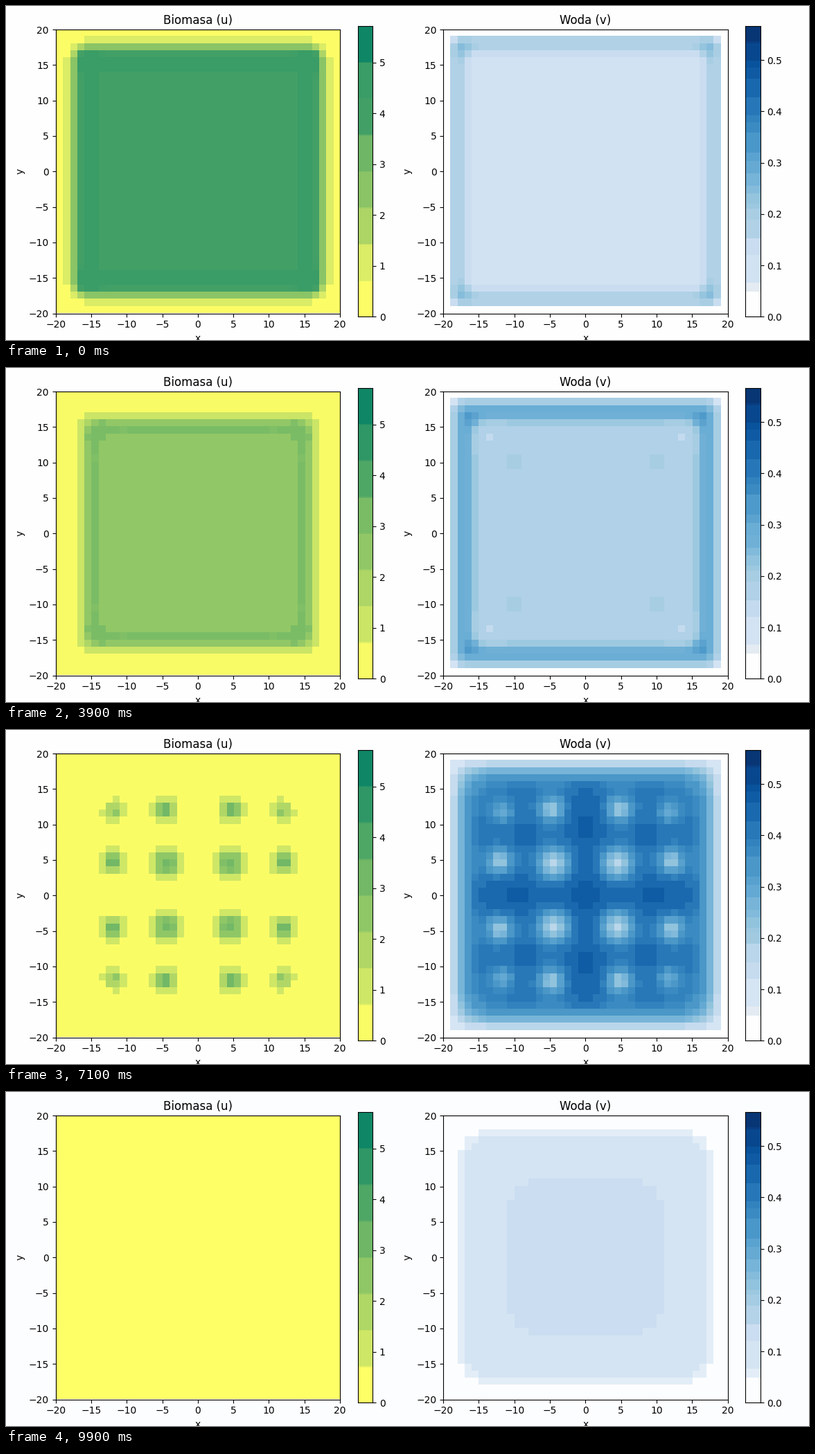
Recreate the animation shown at these times as a matplotlib script. Size 1159 by 483 pixels, loop 10000 ms.

```python
import numpy as np
import matplotlib
import matplotlib.pyplot as plt
from matplotlib.animation import FuncAnimation

W, H, DPI = 1159, 483, 100
FRAMES, INTERVAL = 100, 100
N = 40
U_MAX, V_MAX = 5.72, 0.566

# Klausmeier vegetation model with slowly falling rainfall
MORTALITY = 0.45
DX = 40 / (N - 1)
D_U, D_V = 0.25 / DX**2, 10.5 / DX**2
RAIN_START, RAIN_STEP = 2.0, 0.01893
DT = 0.01
STEPS, WARM_UP = 400, 4000


def laplacian(f):
    return (f[:-2, 1:-1] + f[2:, 1:-1] + f[1:-1, :-2] + f[1:-1, 2:]
            - 4 * f[1:-1, 1:-1])


def advance(u, v, rain, rain_end, steps):
    ui, vi = u[1:-1, 1:-1], v[1:-1, 1:-1]
    for a in np.linspace(rain, rain_end, steps):
        uptake = vi * ui * ui
        du = D_U * laplacian(u) + uptake - MORTALITY * ui
        dv = D_V * laplacian(v) + a - vi - uptake
        ui += DT * du
        vi += DT * dv


def simulate():
    a, m = RAIN_START, MORTALITY
    level = (a + np.sqrt(a * a - 4 * m * m)) / (2 * m)
    u, v = np.zeros((N, N)), np.zeros((N, N))
    u[1:-1, 1:-1] = level
    v[1:-1, 1:-1] = m / level
    advance(u, v, a, a, WARM_UP)
    states = []
    for _ in range(FRAMES):
        states.append((u.copy(), v.copy()))
        advance(u, v, a, a - RAIN_STEP, STEPS)
        a -= RAIN_STEP
    return states


# Colours: every frame is reduced to the mean colour of each RGB bucket
U_MAP = matplotlib.colormaps["summer_r"]
V_MAP = matplotlib.colormaps["Blues"]
CELL_PX, BAR_PX, WHITE_PX, GREY_PX = 105, 34, 205000, 150


def rgb(cmap, values):
    return cmap(np.ravel(values), bytes=True)[:, :3].astype(int)


RAMP = np.linspace(0, 1, 256)
U_RAMP, V_RAMP = rgb(U_MAP, RAMP), rgb(V_MAP, RAMP)
PAPER = np.array([[255] * 3, [232] * 3])
WEIGHTS = np.concatenate([np.full(2 * N * N, CELL_PX), np.full(512, BAR_PX),
                          [WHITE_PX, GREY_PX]]).astype(float)


def flatten_colours(u, v):
    pixels = np.vstack([rgb(U_MAP, u / U_MAX), rgb(V_MAP, v / V_MAX),
                        U_RAMP, V_RAMP, PAPER])
    r, g, b = pixels.T
    key = (r >> 5) * 128 + (g >> 4) * 8 + (b >> 5)
    total = np.bincount(key, WEIGHTS, 1024)
    mean = [np.bincount(key, WEIGHTS * c, 1024)[key] / total[key]
            for c in (r, g, b)]
    return np.stack(mean, axis=1).astype(np.uint8)


# Layout in pixels from the top left
fig = plt.figure(figsize=(W / DPI, H / DPI), dpi=DPI)
SIDE, BAR_OFFSET, BAR_WIDTH = 410.5, 436.3, 21.1


def add_axes(left, top, right, bottom):
    return fig.add_axes([left / W, 1 - bottom / H,
                         (right - left) / W, (bottom - top) / H])


def add_image(ax, shape, extent):
    return ax.imshow(np.zeros(shape + (3,), np.uint8), origin="lower",
                     extent=extent, aspect="auto", interpolation="nearest")


def add_panel(left, title, top_value, bar_ticks):
    ax = add_axes(left, 34, left + SIDE, 34 + SIDE)
    field = add_image(ax, (N, N), (-20, 20, -20, 20))
    ticks = np.arange(-20, 21, 5)
    ax.set(title=title, xlabel="x", ylabel="y", xticks=ticks, yticks=ticks)

    bar_left = left + BAR_OFFSET
    ax = add_axes(bar_left, 29, bar_left + BAR_WIDTH, 449.4)
    bar = add_image(ax, (256, 1), (0, 1, 0, top_value))
    ax.set_xticks([])
    ax.yaxis.tick_right()
    ax.set_yticks(bar_ticks)
    return field, bar


u_field, u_bar = add_panel(71.6, "Biomasa (u)", U_MAX, range(6))
v_field, v_bar = add_panel(631.1, "Woda (v)", V_MAX, np.arange(6) / 10)

states = simulate()


def update(frame):
    colours = flatten_colours(*states[frame])
    cells = N * N
    u_field.set_data(colours[:cells].reshape(N, N, 3))
    v_field.set_data(colours[cells:2 * cells].reshape(N, N, 3))
    u_bar.set_data(colours[2 * cells:2 * cells + 256].reshape(256, 1, 3))
    v_bar.set_data(colours[2 * cells + 256:2 * cells + 512].reshape(256, 1, 3))
    fig.set_facecolor(colours[-2] / 255)
    return u_field, v_field, u_bar, v_bar


anim = FuncAnimation(fig, update, frames=FRAMES, interval=INTERVAL,
                     repeat=True, repeat_delay=0, blit=False)
plt.show()
```
